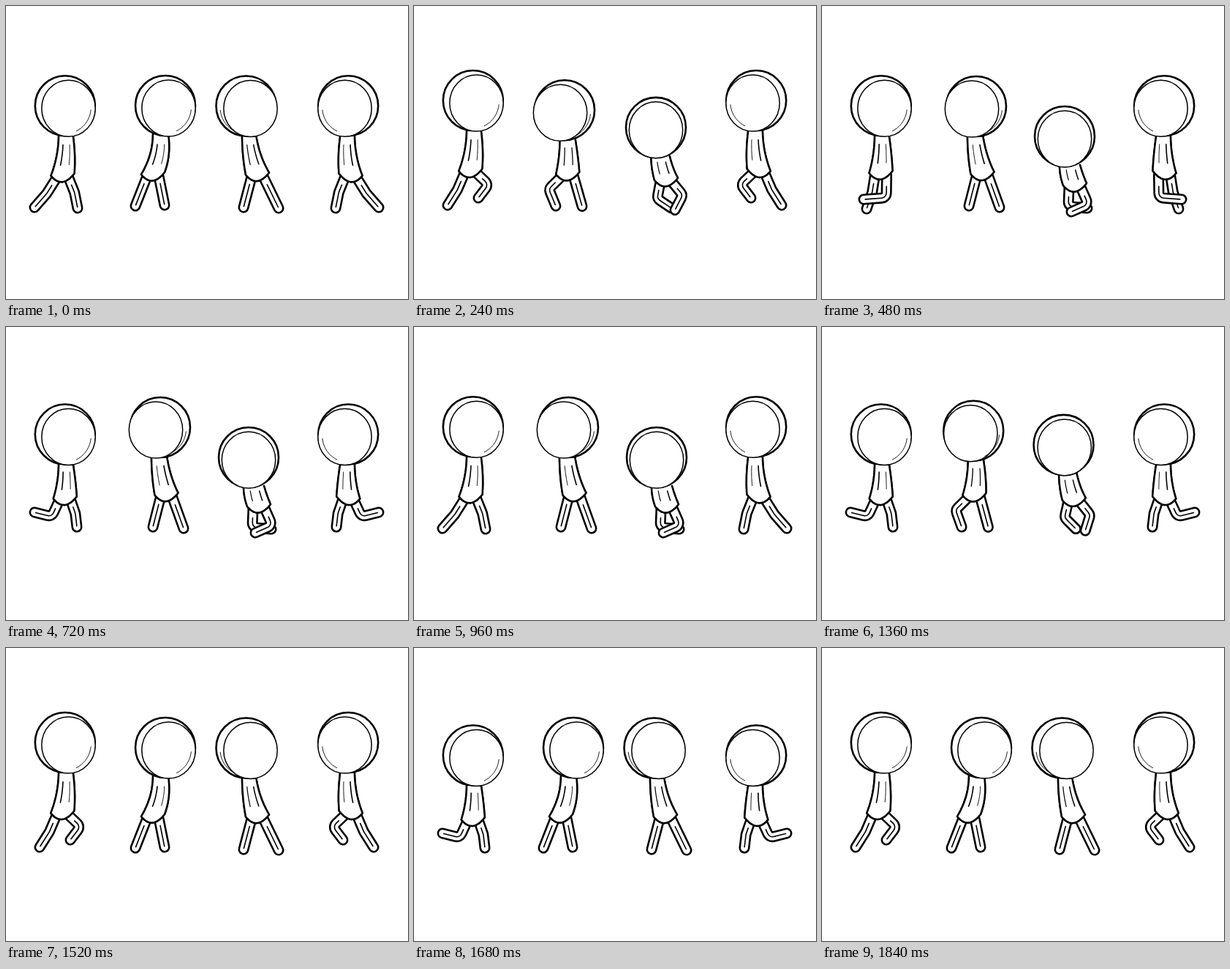
Write an HTML page with a canvas that moves like this. It is 550 px wide and 400 px high and loops after 1920 ms.

```html
<!DOCTYPE html>
<html lang="en">
<head>
<meta charset="utf-8">
<title>Four walkers</title>
<style>
html, body { margin: 0; width: 100%; height: 100%; overflow: hidden; background: #fff; }
canvas { display: block; }
</style>
</head>
<body>
<canvas id="stage" width="550" height="400"></canvas>
<script>
const ctx = document.getElementById('stage').getContext('2d');
const STEP = 80, STEPS = 24, MIRROR = 549;
const { PI, sin, cos, sign, min, max, hypot } = Math;

// Path of one foot through a stride: planted, pushed back, swung forward
const footPath = [[98, 276], [97, 273], [61, 277], [46, 272], [39, 275], [39, 253], [57, 264], [88, 262]];

// neck: x and half width; face: sideways offset on the head
const turn = {
  from: { head: [218, 136], face: 4.5, neck: [211.5, 10.5], hip: [201, 228.5], feet: [[177, 273], [217, 272]] },
  to: { head: [211, 137], face: -6, neck: [209.5, 10.5], hip: [219.5, 228], feet: [[201, 273], [243, 275]] }
};
const crouch = {
  from: { head: [328.5, 136.5], face: 6, neck: [332.5, 9.5], hip: [344, 229], feet: [[325, 275], [373, 276]] },
  to: { head: [332, 178], face: 0, neck: [339, 14], hip: [346, 243.5], feet: [[363, 276], [341, 281]] }
};

const lerp = (a, b, t) => a + (b - a) * t;
const mix = (a, b, t) => a.map((v, i) => lerp(v, b[i], t));

function quad(a, b, c, t) {
  return mix(mix(a, b, t), mix(b, c, t), t);
}

function path(points, width) {
  ctx.beginPath();
  points.forEach(p => ctx.lineTo(...p));
  ctx.lineWidth = width;
  ctx.stroke();
}

// A positive bend pushes the knee to the right
function leg(hip, foot, bend) {
  const dx = foot[0] - hip[0], dy = foot[1] - hip[1], len = hypot(dx, dy);
  const mid = mix(hip, foot, 0.5);
  const knee = [mid[0] + bend * dy / len, mid[1] - bend * dx / len];
  const trace = (start, end, color, width) => {
    ctx.beginPath();
    ctx.moveTo(...start);
    ctx.arcTo(...knee, ...end, 7);
    ctx.lineTo(...end);
    ctx.strokeStyle = color;
    ctx.lineWidth = width;
    ctx.stroke();
  };
  trace(hip, foot, '#000', 15);
  trace(hip, foot, '#fff', 9.8);
  trace(mix(hip, knee, 0.5), mix(knee, foot, 0.93), '#000', 1.6);
}

function torso([neckX, half], neckY, [x, y], widths) {
  const side = s => {
    const top = [neckX + s * half, neckY];
    const hem = [x + s * 16, y - s * 1.5];
    const bow = [top[0] + 2 + s * 2, lerp(neckY, y, 0.53)];
    return t => quad(top, bow, hem, t);
  };
  const left = side(-1), right = side(1);
  const run = (f, a, b) => Array.from({ length: 13 }, (_, i) => f(lerp(a, b, i / 12)));
  const hem = t => quad(left(1), [x - 1, y + 20], right(1), t);
  ctx.fillStyle = '#fff';
  path([...run(left, 0, 1), ...run(hem, 0, 1), ...run(right, 1, 0)], 2.5);
  ctx.fill();
  ctx.stroke();
  const fold = k => t => mix(left(t), right(t), k);
  path(run(fold(0.3), 0.25, 0.75), widths[0]);
  path(run(fold(0.72), 0.25, 0.75), widths[1]);
}

function head([x, y], face, crease) {
  ctx.fillStyle = '#fff';
  ctx.beginPath();
  ctx.arc(x, y, 41, 0, 7);
  ctx.fill();
  ctx.lineWidth = 2.6;
  ctx.stroke();
  ctx.beginPath();
  ctx.ellipse(x + face, y + 3.5, 36.7, 38.5, 0, 0, 7);
  ctx.fill();
  ctx.lineWidth = 1.5;
  ctx.stroke();
  if (!crease) return;
  ctx.beginPath();
  for (let a = 0.1; a < 1.15; a += 0.05) {
    ctx.lineTo(x + crease * (36.5 * cos(a) - 1), y + 2 + 36.5 * sin(a));
  }
  ctx.lineWidth = 0.9;
  ctx.stroke();
}

// legs: socket side, foot and bend, the far leg first
function figure({ head: skull, face, neck, hip, legs }, crease, widths) {
  for (const { side, foot, bend } of legs) {
    leg([hip[0] + side * 8, hip[1] + 4], foot, bend);
  }
  ctx.strokeStyle = '#000';
  torso(neck, skull[1] + 39, hip, widths);
  head(skull, face, crease);
}

function walker(step) {
  const a = step * PI / 2;
  const legs = [4, 0].map(lag => {
    const q = (step + lag) % 8;
    return {
      side: sign(cos((q + 0.5) * PI / 4)),
      foot: footPath[q],
      bend: 2 + 19 * max(0, -sin(q * PI / 4))
    };
  });
  figure({
    head: [80.8, 137 + 8.75 * sin(a) - 0.8 * cos(2 * a)],
    face: 4.7,
    neck: [81.8, 9.7],
    hip: [79 + 1.75 * sin(a) - 1.5 * cos(a), 228.4 + 4.5 * sin(a) + 1.75 * cos(a)],
    legs
  }, 1, [1.6, 0.9]);
}

// The head and the left foot lead, the hips and the right foot follow
function change({ from, to }, t, swing, bends) {
  const lead = sin(t * PI / 2), arc = sin(t * PI);
  const skull = mix(from.head, to.head, lead);
  return {
    head: [skull[0] - swing * 7 * arc, skull[1] + swing * 5.5 * arc],
    face: lerp(from.face, to.face, min(1, 2 * t)),
    neck: mix(from.neck, to.neck, lead),
    hip: mix(from.hip, to.hip, t),
    legs: [lead, t].map((k, i) => ({
      side: 2 * i - 1,
      foot: mix(from.feet[i], to.feet[i], k),
      bend: bends[i]
    }))
  };
}

// There in six steps, a rest, and back in five
function progress(step) {
  return max(0, min(1, step / 6, (19 - step) / 5));
}

function draw(step) {
  ctx.fillStyle = '#fff';
  ctx.fillRect(0, 0, 550, 400);
  ctx.lineCap = ctx.lineJoin = 'round';

  walker(step);
  ctx.save();
  ctx.translate(MIRROR, 0);
  ctx.scale(-1, 1);
  walker(step);
  ctx.restore();

  const t = progress(step), fold = 18 * sin(t * PI / 2);
  const widths = [lerp(1.6, 0.9, t), lerp(0.9, 1.6, t)];
  figure(change(turn, t, 1, [-14 * sin(t * PI), 0]), 1, widths);
  figure(change(crouch, t, 0, [-fold, fold]), t < 0.3 ? -1 : 0, [1.2, 1.5]);
}

const start = performance.now();
let shown = -1;
function tick() {
  const step = Math.floor((performance.now() - start) / STEP) % STEPS;
  if (step !== shown) draw(shown = step);
  requestAnimationFrame(tick);
}
tick();
</script>
</body>
</html>
```
